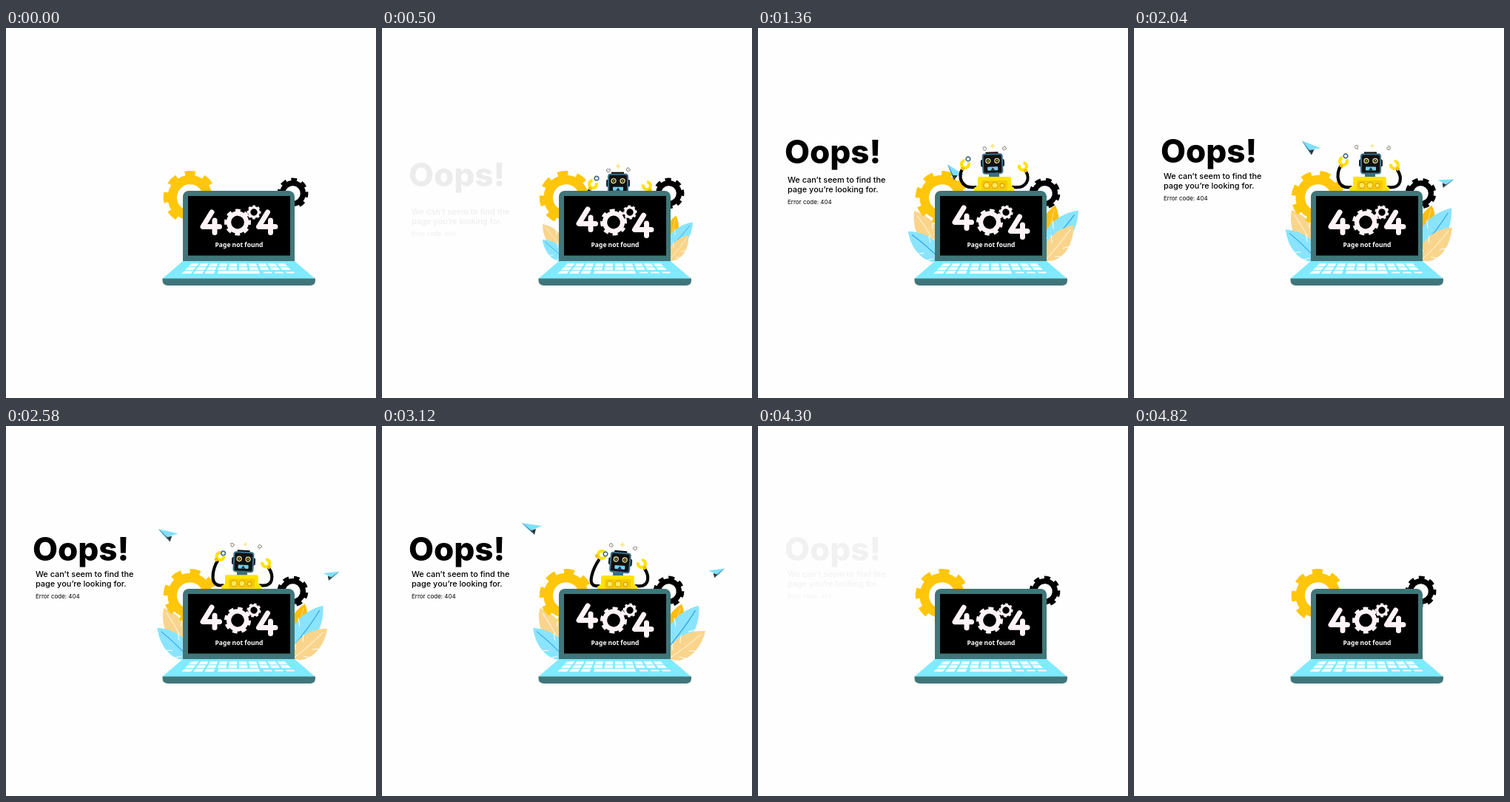
Recreate the animation shown at these times as an HTML page. Size 500 by 500 pixels, loop 4840 ms.

```html
<!DOCTYPE html>
<html lang="en">
<head>
<meta charset="utf-8">
<title>404</title>
<style>
html, body { margin: 0; width: 100%; height: 100%; overflow: hidden; background: #fefefe; }
svg { display: block; width: 100%; height: 100%; }
text { font-family: Inter, sans-serif; }
</style>
</head>
<body>
<svg viewBox="0 0 500 500">
  <defs>
    <g id="gear" fill="none" stroke="currentColor">
      <circle r="24" stroke-width="12.5"/>
      <circle r="32" stroke-width="8" pathLength="8" stroke-dasharray=".54 .46" stroke-dashoffset=".27"/>
    </g>
    <g id="leaf">
      <path d="M0 0C-17-7-20-36 0-60C20-36 17-7 0 0" fill="currentColor"/>
      <path d="M-15-31l7 7M-13-15l7 5M14-35l-6 8M14-18l-7 6" stroke="#fefefe" fill="none"/>
    </g>
    <path id="four" d="M278 249L266 268.500H288.500M282 260V276.500" fill="none" stroke="#fff3f8" stroke-width="7" stroke-linecap="round" stroke-linejoin="round"/>
    <g id="plane">
      <path d="M-13-7L14-3L0 3Z" fill="#7fe0fa"/>
      <path d="M-13-7L0 3L4 9Z" fill="#1d3f4c"/>
      <path d="M-13-7L-3 3L0 3Z" fill="#4aa9c4"/>
      <path d="M0 3L4 9L6 1Z" fill="#27363c"/>
    </g>
    <g id="hand">
      <path d="M-3-4A5 5 0 1 0 3-4" fill="none" stroke="#ffe10a" stroke-width="4.200"/>
      <rect x="-2.500" y="5" width="5" height="4" rx="1" fill="#f2bd00"/>
    </g>
    <path id="curl" d="M-3 2C-4-3 2-5 3-1S-1 4-1 0" fill="none" stroke="#554a3a" stroke-width=".9"/>
  </defs>

  <g id="leaves"></g>
  <use href="#gear" id="yellowGear" color="#ffc60a"/>
  <use href="#plane" id="planeL"/>
  <use href="#plane" id="planeR"/>
  <use href="#gear" id="blackGear" color="#000"/>

  <g id="robot">
    <g fill="none" stroke="#080808" stroke-width="4.200" stroke-linecap="round">
      <path id="armL"/><path id="armR"/>
    </g>
    <rect x="312" y="195" width="14" height="8" fill="#3c6f80"/>
    <g id="torso">
      <path d="M299 201H339Q342 201 342 204V213L346 216V238H292V216L297 213V204Q297 201 299 201" fill="#ffe300"/>
      <rect x="302" y="206" width="35" height="13" rx="2" fill="#f7c900"/>
      <g fill="#ffe95c" stroke="#e2a500" stroke-width="1.300">
        <circle cx="309" cy="212.500" r="4"/><circle cx="320" cy="212.500" r="4"/><circle cx="330" cy="213" r="2.800"/>
      </g>
    </g>
    <use href="#hand" id="handL"/>
    <use href="#hand" id="handR"/>
    <circle id="nut" r="2.800" fill="#fefefe" stroke="#456c80" stroke-width="1.700"/>
    <g id="head">
      <path d="M-9-11V-15H8V-11" fill="#111"/>
      <rect x="-16" y="-5" width="32" height="10" rx="2" fill="#17272f"/>
      <rect x="-13" y="-12" width="26" height="26" rx="3" fill="#111" stroke="#396f88" stroke-width="2"/>
      <g fill="#111" stroke="#e9dfa0" stroke-width="1.300">
        <circle cx="-6" cy="-3" r="3"/><circle cx="6" cy="-3" r="3"/>
      </g>
      <path d="M-7-3h2M5-3h2" stroke="#ffe10a" stroke-width="1.400"/>
      <rect x="-7" y="5" width="14" height="5" rx="1" fill="#72cfe8"/>
      <path d="M-3 10L0 6L3 10Z" fill="#17303a"/>
    </g>
    <path id="spark" d="M0-4L1.200-1L4 1L1 2L0 6L-1 2L-4 1L-1.200-1Z" fill="#ffe48a"/>
    <use href="#curl" id="curlL"/>
    <use href="#curl" id="curlR"/>
  </g>

  <rect x="239" y="220" width="151" height="104" rx="8" fill="#407679"/>
  <rect x="246" y="227" width="138" height="80.500"/>
  <path d="M239 315H390L418 339H211Z" fill="#80eaff"/>
  <path d="M211.500 338.500H418V341Q418 348 411 348H219Q211.500 348 211.500 341Z" fill="#407679"/>
  <path id="keys" fill="#f8fbff"/>

  <use href="#four" id="fourL"/>
  <use href="#four" id="fourR"/>
  <use href="#gear" id="bigCog" color="#fff3f8"/>
  <use href="#gear" id="smallCog" color="#fff3f8"/>
  <text x="315" y="296" text-anchor="middle" fill="#fff" style="font:600 8.500px 'Noto Sans', sans-serif">Page not found</text>

  <g id="title"><text x="36" y="182" font-size="44" font-weight="800">Oops!</text></g>
  <g id="message">
    <g font-size="10.900" font-weight="500">
      <text x="40" y="204">We can’t seem to find the</text>
      <text x="40" y="217">page you’re looking for.</text>
    </g>
    <text x="40" y="233" font-size="8">Error code: 404</text>
  </g>
</svg>
<script>
const LOOP = 4840;
const $ = id => document.getElementById(id);
const move = (id, x, y, turn = 0, sx = 1, sy = sx) =>
  $(id).setAttribute('transform', `translate(${x} ${y}) rotate(${turn}) scale(${sx} ${sy})`);
const fade = (id, v) => $(id).setAttribute('opacity', v);

// Monotone cubic through time/value pairs, held at both ends.
function track(t, ...k) {
  const n = k.length / 2 - 1;
  if (t <= k[0]) return k[1];
  if (t >= k[2 * n]) return k[2 * n + 1];
  const slope = i => (k[2 * i + 3] - k[2 * i + 1]) / (k[2 * i + 2] - k[2 * i]);
  const tangent = i => {
    if (i < 1 || i >= n) return 0;
    const a = slope(i - 1), b = slope(i);
    return a * b > 0 ? 2 * a * b / (a + b) : 0;
  };
  let i = 0;
  while (t >= k[2 * i + 2]) i++;
  const d = k[2 * i + 2] - k[2 * i], u = (t - k[2 * i]) / d, v = 1 - u;
  return k[2 * i + 1] * (1 + 2 * u) * v * v + k[2 * i + 3] * u * u * (3 - 2 * u)
    + d * u * v * (tangent(i) * v - tangent(i + 1) * u);
}

// Value through the five main poses of the robot and leaves.
const pose = (t, a, b, c, d, e) => track(t, 860, a, 1360, b, 2040, c, 3120, d, 3880, e);

const leaves = [
  { x: 389, y: 287, size: .82, color: '#ffbd0c', vein: '#ffe2a0', turns: [14, 15, 16, 19, 18] },
  { x: 243, y: 298, size: 1, color: '#f9d58c', vein: '#fff2d8', turns: [-38, -32, -30, -30, -30] },
  { x: 248, y: 314, size: 1, color: '#8ae4fd', vein: '#2e9fe8', turns: [-48, -49, -46, -47, -45] },
  { x: 388, y: 298, size: 1.14, color: '#8ae4fd', vein: '#2e9fe8', turns: [42, 41, 37, 36, 36] },
  { x: 388, y: 314, size: 1.02, color: '#f9d58c', vein: '#fff2d8', turns: [38, 39, 43, 53, 47] }
];
$('leaves').innerHTML = leaves.map((l, i) => `<g id="leaf${i}"><use href="#leaf" color="${l.color}"/>
  <path d="M0 0Q2-28 0-53" stroke="${l.vein}" fill="none"/></g>`).join('');

// Keyboard in perspective: u runs from -1 to 1 across the deck.
const deckX = (u, y) => 314.5 + u * (75.5 + (y - 315) * 1.15);
const key = (u, w, y, h) =>
  `M${deckX(u, y)} ${y}H${deckX(u + w, y)}L${deckX(u + w, y + h)} ${y + h}H${deckX(u, y + h)}Z`;
let keys = key(-.3, .6, 328, 4);
for (let i = 0; i < 10; i++) {
  const u = -.81 + i * .163;
  keys += key(u, .13, 318.3, 4) + key(u, .13, 323.3, 3.8);
  if (i < 3) keys += key(u, .13, 328, 4) + key(.36 + i * .163, .12, 329.5, 2);
}
$('keys').setAttribute('d', keys);

function drawRobot(t) {
  move('robot', 0, track(t, 180, 72, 540, 23, 860, 4, 1360, 0, 2040, 0, 3120, 1, 3880, 7, 4380, 72));
  const sway = pose(t, 1, 0, -1, -1, -2);
  move('torso', sway, 0);
  move('head', pose(t, 319, 317, 320, 322, 325), 182.5, pose(t, 0, -2, 0, 5, 6));

  const lx = pose(t, 285, 280, 283, 297, 303), ly = pose(t, 184, 184, 180, 173, 178);
  const rx = pose(t, 358, 358, 352, 351, 359), ry = pose(t, 186, 187, 185, 185, 194);
  move('handL', lx, ly, pose(t, 32, 30, 23, 75, 50));
  move('handR', rx, ry, pose(t, -35, -30, -40, -35, -65));
  move('nut', lx + pose(t, 5, 4, 3, 5, 5), ly + pose(t, -8, -7, -7, -1, -4));
  const arm = (id, side, x, y) => {
    const sx = 319 + sway + side * 25;
    $(id).setAttribute('d', `M${sx} 215C${sx + side * 20} 218 ${x + side * 10} ${y + 16} ${x + side * 4} ${y + 7}`);
  };
  arm('armL', -1, lx, ly);
  arm('armR', 1, rx, ry);

  move('spark', pose(t, 319, 317, 322, 325, 328), 159, 0, .85 + .15 * Math.sin(t / 70));
  move('curlL', pose(t, 306, 306, 301, 310, 306), pose(t, 165, 163, 161, 160, 166), t * .3, .8);
  move('curlR', pose(t, 333, 333, 344, 342, 350), pose(t, 164, 163, 162, 164, 163), -t * .3, .8);
}

function drawPlanes(t) {
  const out = 1 - track(t, 3550, 0, 4200, 1);
  move('planeL', track(t, 1150, 292, 1360, 265, 2040, 238, 3120, 202, 3880, 188, 4200, 187),
    track(t, 1150, 230, 1360, 196, 2040, 162, 3120, 138, 3880, 133, 4200, 132.5),
    track(t, 1360, 25, 2040, 13, 3120, 0));
  move('planeR', track(t, 1300, 380, 2040, 421.5, 3120, 452.5, 3880, 463, 4200, 463.5),
    track(t, 1300, 232, 2040, 209, 3120, 198, 3880, 196.5, 4200, 196.5),
    track(t, 2040, 5, 3120, 0), -.8, .8);
  fade('planeL', t < 1150 ? 0 : out);
  fade('planeR', t < 1300 ? 0 : out);
}

function draw(t) {
  const grow = track(t, 180, 0, 540, .76, 840, 1, 3860, 1, 4360, 0);
  leaves.forEach((l, i) => move('leaf' + i, l.x, l.y, pose(t, ...l.turns), l.size * grow));

  const turn = 360 * t / LOOP;
  move('yellowGear', 248.7, 229, turn);
  move('blackGear', 387.5, 223.5, 4 + turn, .58);
  move('bigCog', 313, 262.5, turn, .5);
  move('smallCog', 335, 249, turn, .265);

  const lift = track(t, 0, 0, 800, 6, 1450, 6, 2080, 0, 2900, 6, 3950, 6, 4800, 0);
  move('fourL', 0, -lift);
  move('fourR', 75.5, lift);

  drawRobot(t);
  drawPlanes(t);

  const out = 1 - track(t, 3900, 0, 4360, 1);
  move('title', 0, track(t, 420, 36, 540, 30, 860, 13, 1080, 5, 1360, 1, 1600, 0));
  move('message', 0, track(t, 420, 50, 860, 26, 1360, 5, 1900, 0));
  fade('title', track(t, 420, 0, 860, .88, 1060, 1) * out);
  fade('message', track(t, 420, 0, 860, .83, 1100, 1) * out);
}

function tick() {
  draw(performance.now() % LOOP);
  requestAnimationFrame(tick);
}
tick();
</script>
</body>
</html>
```
